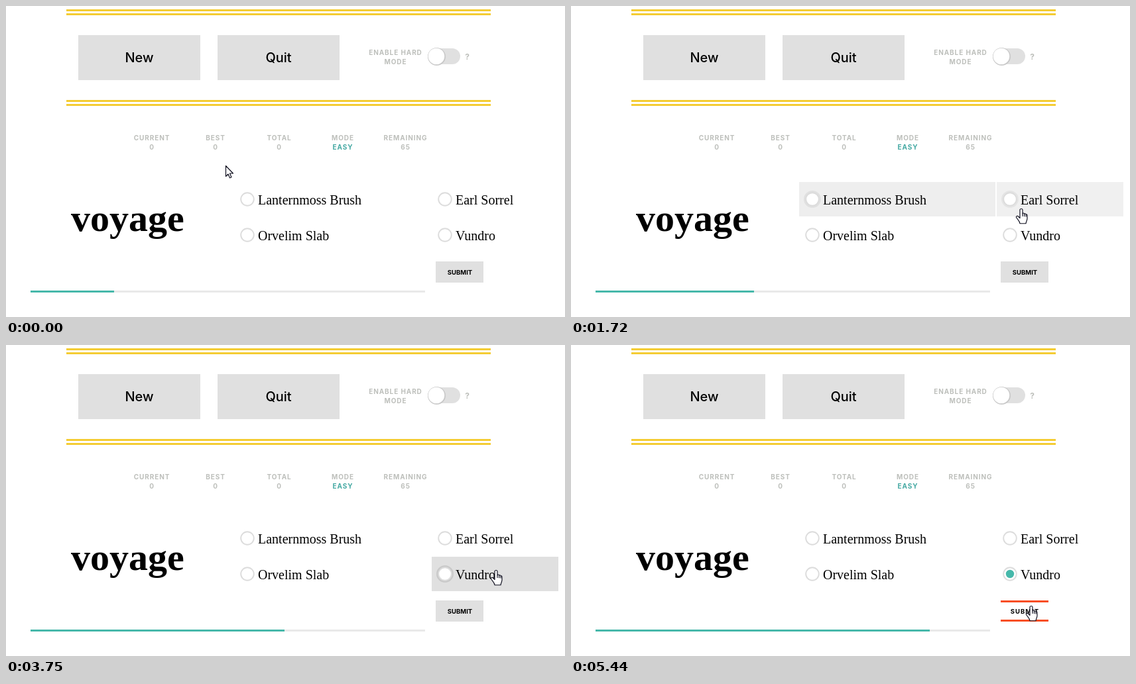
An HTML page for the animation above (5520 ms loop, 843x470 px).

```html
<!DOCTYPE html>
<html lang="en">
<head>
<meta charset="utf-8">
<title>Font quiz</title>
<style>
  html, body { margin: 0; width: 100%; height: 100%; overflow: hidden; background: #fff; }
  svg { display: block; }
  text { font-family: Inter, sans-serif; text-anchor: middle; }
  .big { font-size: 20px; font-weight: 500; }
  .label { font-size: 10px; font-weight: 700; letter-spacing: .9px; fill: #bdbfbb; }
  .label .easy { fill: #45a9a3; }
  .submit { font-size: 9.5px; font-weight: 700; }
  .choice { font: 20px "Liberation Serif", serif; text-anchor: start; }
  .word { font: bold 58px "Liberation Serif", serif; text-anchor: start; }
  .cursor { fill: #fff; stroke: #0c0c1c; stroke-width: 1.15; stroke-linejoin: round; }
</style>
</head>
<body>
<svg width="843" height="470" viewBox="0 0 843 470">
  <path d="M91 6.5H731M91 12.5H731M91 143.5H731M91 149.5H731" stroke="#f4cc34" stroke-width="3"/>
  <path d="M109 44h184v68h-184zM319 44h184v68h-184z" fill="#e0e0e0"/>
  <text class="big" x="201" y="85">New</text>
  <text class="big" x="411" y="85">Quit</text>

  <g class="label">
    <text x="587.5" y="74">ENABLE HARD</text>
    <text x="587.5" y="88">MODE</text>
    <text x="696" y="81" style="font-size:12px">?</text>
  </g>
  <rect x="636" y="64" width="49" height="24" rx="12" fill="#e0e0e0"/>
  <circle cx="649.5" cy="76.5" r="13.5" fill="#c8c8c8"/>
  <circle cx="649" cy="76" r="12.3" fill="#fff"/>

  <g class="label" id="stats"></g>
  <text class="word" x="98" y="340">voyage</text>
  <g id="choices"></g>

  <rect id="button" x="648" y="386" width="72" height="32" fill="#e0e0e0"/>
  <path id="lines" stroke="#f84e22" stroke-width="3"/>
  <text id="submit" class="submit" x="684.5" y="406">SUBMIT</text>

  <rect x="37" y="430" width="595" height="3" fill="#e9e9e9"/>
  <rect id="progress" x="37" y="430" height="3" fill="#46b8aa"/>

  <path id="arrow" class="cursor" d="M.5 .5V16.5L4 13 6.5 18.8 9 17.8 6.5 12H11.5Z"/>
  <g id="hand" class="cursor">
    <path d="M-2 2C-2 0 2 0 2 2V8C2 6.5 4.5 6.7 4.7 8.5C5 7.3 7 7.5 7.2 9.2C7.8 8.3 9 8.8 9 10.5V15C9 18 7.5 19 7 22.7H-2C-2.5 19-5 17.5-7.5 13.5C-8.2 11.5-5.5 10.5-4 12.5L-2 14.5Z"/>
    <path d="M2 8V12M4.7 8.5V12.3M7.2 9.2V12.6" fill="none"/>
  </g>
</svg>
<script>
const LOOP = 5520, FIRST_HOLD = 170, STEP = 77.5, FADE = 300;
const CLICK = 3900, ON_SUBMIT = 4510;
const $ = id => document.getElementById(id);
const clamp = v => Math.max(0, Math.min(1, v));

const stats = [[220, "CURRENT", 0], [316, "BEST", 0], [412, "TOTAL", 0], [508, "MODE", "EASY"], [602.5, "REMAINING", 65]];
$("stats").innerHTML = stats.map(([x, name, value]) =>
  `<text x="${x}" y="203">${name}</text>
   <text x="${x}" y="217" class="${value === "EASY" ? "easy" : ""}">${value}</text>`).join("");

// Each choice is hovered between the times "from" and "to".
const choices = [
  { name: "Lanternmoss Brush", x: 344, y: 266, w: 296, from: 885, to: 1580 },
  { name: "Earl Sorrel", x: 642, y: 266, w: 191, from: 1580, to: 2660 },
  { name: "Orvelim Slab", x: 344, y: 320, w: 296, from: 2660, to: 2980 },
  { name: "Vundro", x: 642, y: 320, w: 191, from: 2980, to: 4405 }
];
$("choices").innerHTML = choices.map(({ name, x, y, w }) =>
  `<g transform="translate(${x} ${y})">
    <rect class="back" width="${w}" height="52" opacity="0"/>
    <circle class="glow" cx="20" cy="26" r="11" fill="none" stroke="#000" stroke-width="4" opacity="0"/>
    <circle cx="20" cy="26" r="9.8" fill="#fff" stroke="#dcdcdc" stroke-width="1.9"/>
    <circle class="dot" cx="20" cy="26" r="0" fill="#46b8aa"/>
    <text class="choice" x="36" y="33.5">${name}</text>
  </g>`).join("");
const backs = document.querySelectorAll(".back");
const glows = document.querySelectorAll(".glow");
const dots = document.querySelectorAll(".dot");

// Pointer path: time, x, y
const path = [
  [170, 331, 241], [700, 353, 247], [885, 395, 266], [950, 421, 280], [1250, 449, 290],
  [1340, 449, 290], [1580, 641, 300], [1800, 701, 309], [2510, 701, 309], [2680, 640, 320],
  [2850, 615, 330], [2980, 641, 332], [3040, 647, 333], [3600, 739, 340], [3750, 739, 340],
  [4200, 716, 352], [4440, 709, 377], [4620, 694, 394]
];

function pointerAt(t) {
  const next = path.findIndex(p => p[0] > t);
  if (next === 0) return path[0].slice(1);
  if (next < 0) return path[path.length - 1].slice(1);
  const [t0, x0, y0] = path[next - 1], [t1, x1, y1] = path[next];
  const k = (t - t0) / (t1 - t0);
  return [x0 + (x1 - x0) * k, y0 + (y1 - y0) * k].map(Math.round);
}

function draw(t) {
  choices.forEach(({ from, to }, i) => {
    const level = Math.min(clamp((t - from) / FADE), 1 - clamp((t - to) / FADE));
    backs[i].setAttribute("opacity", level * .122);
    glows[i].setAttribute("opacity", level * .1);
  });
  dots[3].setAttribute("r", 6.2 * clamp((t - CLICK) / 150));

  const hover = clamp((t - ON_SUBMIT) / FADE);
  $("button").setAttribute("opacity", 1 - hover);
  $("lines").setAttribute("d", hover ? `M648 387.5h${72 * hover}M648 416.5h${72 * hover}` : "");
  $("submit").style.letterSpacing = hover + "px";

  const end = t < FIRST_HOLD ? 163 : 541 - .0712 * (5440 - t);
  $("progress").setAttribute("width", Math.round(end) - 37);

  const isArrow = t < 885 || (t > 4405 && t < ON_SUBMIT);
  const [x, y] = pointerAt(t);
  for (const id of ["arrow", "hand"]) {
    $(id).setAttribute("transform", `translate(${x} ${y})`);
    $(id).setAttribute("visibility", (id === "arrow") === isArrow ? "visible" : "hidden");
  }
}

function tick() {
  const t = performance.now() % LOOP;
  draw(t < FIRST_HOLD ? 0 : FIRST_HOLD + STEP * Math.floor((t - FIRST_HOLD) / STEP));
  requestAnimationFrame(tick);
}
tick();
</script>
</body>
</html>
```
